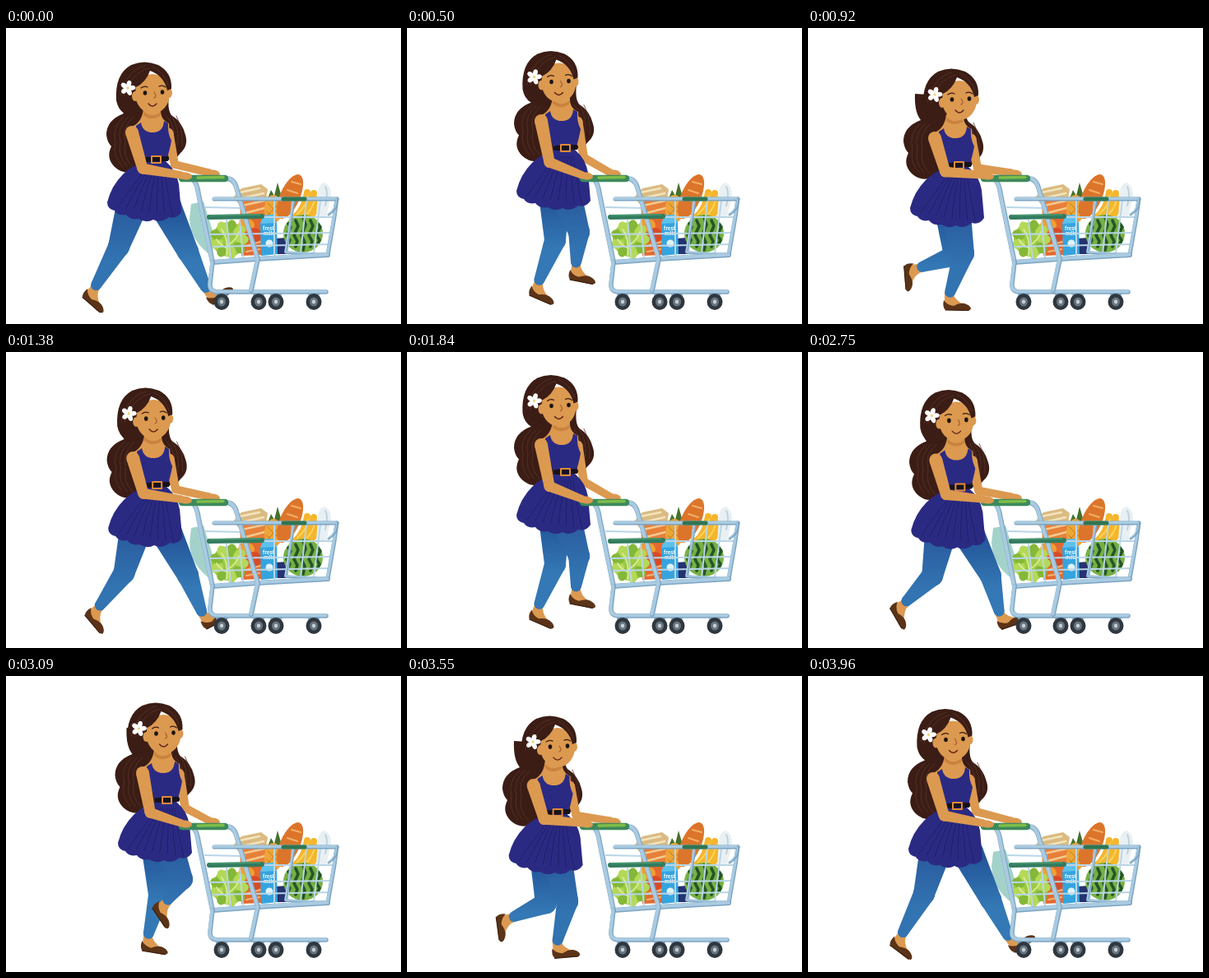
Animation, 480 px wide and 360 px high, one loop 4000 ms. Source, as an HTML page with a canvas:

```html
<!DOCTYPE html>
<html lang="en">
<head>
<meta charset="utf-8">
<title>Shopping walk</title>
<style>
html, body { margin: 0; width: 100%; height: 100%; overflow: hidden; background: #fff; }
canvas { display: block; width: 480px; height: 360px; }
</style>
</head>
<body>
<canvas id="stage"></canvas>
<script>
const canvas = document.getElementById('stage');
const dpr = window.devicePixelRatio || 1;
canvas.width = 480 * dpr;
canvas.height = 360 * dpr;
const c = canvas.getContext('2d');
c.lineCap = c.lineJoin = 'round';

const LOOP = 4000, STEPS = 96, CYCLE = 32;
const SKIN = '#dc9950', SKIN_DARK = '#c9833f', HAIR = '#3b1d15', DRESS = '#2b2a83', FOLD = '#201f6b';
const TUBE = '#a9cbe1', TUBE_DARK = '#7ea5c3';

// phase, body x, body y, head x, head y, hair x
const BODY = [
  [0, 0, 0, 0, 0, 0], [5, 6, 8, 6, 8, 3], [10, 13, -9, 13.5, -9, 10.5],
  [12, 10, -14, 6.5, -13.5, 8], [16, 2, -7, 0, -6, 0], [22, 1, 7, 6, 8, -6],
  [26, 7, -4, 8, -4, 4], [28, 4, -9, 5, -9, 4], [31, -1, -2, -1.5, -1.5, -1]
];
// phase, knee x, knee y, ankle x, ankle y, foot angle
const NEAR = [
  [0, 137, 266, 107, 317, 40], [5, 176, 276, 137, 290, 80], [10, 214, 247, 194, 276, 55],
  [12, 209, 248, 205, 290, 10], [16, 221, 270, 243, 321, -35], [22, 189, 274, 171, 326, 0],
  [26, 163, 272, 156, 323, 10], [31, 141, 265, 113, 316, 36]
];
const FAR = [
  [0, 221, 272, 245, 320, -35], [5, 219, 270, 213, 320, 0], [10, 186, 266, 172, 318, 8],
  [12, 180, 258, 159, 311, 22], [16, 139, 260, 108, 314, 42], [22, 178, 277, 134, 292, 84],
  [26, 229, 257, 195, 297, 52], [31, 222, 272, 245, 320, -35]
];

// smooth periodic curve through the keys
function sample(keys, p) {
  const n = keys.length;
  const at = i => {
    const turn = Math.floor(i / n), k = keys[i - turn * n];
    return [k[0] + turn * CYCLE, ...k.slice(1)];
  };
  let i = n - 1;
  while (keys[i][0] > p) i--;
  const [a, b, d, e] = [at(i - 1), at(i), at(i + 1), at(i + 2)];
  const span = d[0] - b[0], u = (p - b[0]) / span, u2 = u * u, u3 = u2 * u;
  return b.slice(1).map((v, j) => {
    const w = d[j + 1];
    const m0 = (w - a[j + 1]) / (d[0] - a[0]) * span;
    const m1 = (e[j + 1] - v) / (e[0] - b[0]) * span;
    return (2 * u3 - 3 * u2 + 1) * v + (u3 - 2 * u2 + u) * m0 + (3 * u2 - 2 * u3) * w + (u3 - u2) * m1;
  });
}

const fill = (d, color) => { c.fillStyle = color; c.fill(new Path2D(d)); };
const line = (d, color, w) => { c.strokeStyle = color; c.lineWidth = w; c.stroke(new Path2D(d)); };
function oval(x, y, rx, ry, color, turn = 0) {
  c.beginPath();
  c.ellipse(x, y, rx, ry, turn, 0, Math.PI * 2);
  c.fillStyle = color;
  c.fill();
}
function shifted(x, y, draw) {
  c.save();
  c.translate(x, y);
  draw();
  c.restore();
}
function taper(x0, y0, r0, x1, y1, r1, color) {
  const a = Math.atan2(y1 - y0, x1 - x0) + Math.PI / 2, s = Math.sin(a), k = Math.cos(a);
  c.beginPath();
  c.moveTo(x0 + k * r0, y0 + s * r0);
  c.lineTo(x1 + k * r1, y1 + s * r1);
  c.lineTo(x1 - k * r1, y1 - s * r1);
  c.lineTo(x0 - k * r0, y0 - s * r0);
  c.fillStyle = color;
  c.fill();
  oval(x0, y0, r0, r0, color);
  oval(x1, y1, r1, r1, color);
}

function leg(keys, p, bx, by, top, low) {
  const [kx, ky, ax, ay, turn] = sample(keys, p);
  const mid = 168 + bx, hx = mid + (kx - mid) * 0.5, hy = 218 + by;
  const shade = c.createLinearGradient(0, hy + 5, 0, hy + 65);
  shade.addColorStop(0, top);
  shade.addColorStop(1, low);

  c.save();
  c.translate(ax, ay);
  c.rotate(turn * Math.PI / 180);
  fill('M-5 -5 L5 -5 Q6 5 20 11 L12 15 L-5 14Z', SKIN);
  fill('M-6 5 Q-2 11 6 12 Q13 8 19 9 Q26 11 27 15 Q27 18 20 18 L-4 17 Q-8 13 -6 5Z', '#5b3317');
  line('M-4 17 L24 17.5', '#3c2212', 1.2);
  c.restore();

  taper(hx, hy, 19, kx, ky, 13, shade);
  const len = Math.hypot(ax - kx, ay - ky) || 1, cut = (len - 5) / len;
  taper(kx, ky, 13, kx + (ax - kx) * cut, ky + (ay - ky) * cut, 6.5, shade);
}

function backHair() {
  fill('M136 72 Q135 94 143 104 Q122 112 122 130 Q123 139 128 144 Q121 158 132 169 Q144 180 160 173 L196 160 Q207 160 212 152 Q222 143 218 130 Q214 114 201 106 Q195 98 199 76Z', HAIR);
  for (let i = 0; i < 3; i++) {
    const x = i * 6;
    line(`M${143 + x} 108 Q${128 + x} 121 ${133 + x} 139 Q${129 + x} 155 ${141 + x} 168`, '#59342a', 0.8);
    line(`M${195 + x} 107 Q${209 + x / 2} 122 ${202 + x} 143`, '#59342a', 0.8);
  }
}

function torso() {
  fill('M167 98 L188 98 Q187 111 198 116 L199 132 L155 134 L150 121 Q165 117 167 98Z', SKIN);
  fill('M167 101 Q177 111 188 102 L187 107 Q177 114 167 106Z', SKIN_DARK);
  fill('M158 119 L164 115 Q166 128 180 127 Q191 126 192 113 L197 116 Q196 127 201 137 Q199 149 194 164 L169 166 Q166 146 158 137Z', DRESS);
  fill('M168 163 L195 163 Q207 173 210 190 L213 224 Q207 233 198 230 Q188 238 179 233 Q170 238 161 232 Q151 234 146 227 Q136 229 132 222 Q123 220 123 212 Q128 192 142 178 Q153 167 168 163Z', DRESS);
  for (let i = 0; i < 8; i++)
    line(`M${171 + i * 3} 170 Q${153 + i * 6} 193 ${136 + i * 9.5} ${218 + i * 1.5}`, FOLD, 1);
  line('M171 160 L195 159', '#17121a', 6);
  line('M177 156 H188 V164 H177Z', '#e08a35', 2);
}

function head() {
  oval(198, 79, 4, 6, SKIN);
  oval(178, 80, 21, 24, SKIN);
  fill('M134 88 Q132 56 152 45 Q168 38 185 45 Q202 54 201 74 L196 76 Q192 58 175 52 Q170 66 158 72 Q154 80 159 94 Q153 102 144 104 Q136 99 134 88Z', HAIR);
  line('M174 49 Q153 53 143 83', '#5a342a', 0.8);
  line('M169 46 Q147 51 139 82', '#5a342a', 0.8);
  line('M178 47 Q192 53 197 69', '#5a342a', 0.8);
  oval(157, 83, 4, 6, SKIN);
  oval(169, 79, 2.3, 2.8, '#1d1512');
  oval(190, 78, 2.3, 2.8, '#1d1512');
  line('M164 73 Q168 70 172 72 M186 71 Q190 69 194 72', '#3b1d15', 1.2);
  line('M180 78 Q184 84 180 85', '#a86230', 1.3);
  line('M173 92 Q178 98 183 92', '#5a2317', 1.4);
  for (let i = 0; i < 5; i++) {
    const a = i * Math.PI * 0.4 - 1.3;
    oval(148 + Math.cos(a) * 5, 73 + Math.sin(a) * 5, 4.4, 2.9, '#fff', a);
  }
  oval(148, 73, 1.8, 1.8, '#efd68a');
}

function arm(sx, sy, ex, ey, hx, hy, r) {
  taper(sx, sy, r, ex, ey, r - 1.5, SKIN);
  taper(ex, ey, r - 1.5, hx - 8, hy - 1, 4.5, SKIN);
  oval(hx - 3, hy, 8, 4.5, SKIN, 0.12);
}

function groceries() {
  fill('M276 206 L286 195 L310 190 L318 196 L316 208 L288 220Z', '#d9bb83');
  line('M284 200 L308 195 M287 207 L313 201', '#f4e3bc', 2.5);
  fill('M284 211 L320 205 L333 232 L310 240 L285 230Z', '#e6803a');
  line('M287 216 L314 210 M291 225 L318 218', '#f6c98e', 2.5);
  fill('M317 210 L322 197 L326 204 L330 188 L334 202 L338 206 L330 214Z', '#45712d');
  oval(325, 220, 11, 17, '#eda638');
  line('M318 213 L332 227 M317 223 L328 235 M333 212 L318 228', '#c97422', 1);
  // loaf
  oval(345, 205, 12, 29, '#dc752b', 0.42);
  line('M347 187 L358 190 M342 197 L354 201 M337 207 L350 211', '#f3ae66', 2);
  line('M350 231 Q363 221 366 200 M359 231 Q372 220 374 201 M368 230 Q379 222 379 209', '#f5b62d', 8);
  line('M354 226 Q366 216 367 204 M366 226 Q375 216 375 206', '#fbd45a', 2);
  fill('M377 230 L379 201 Q380 189 387 188 Q395 191 395 204 L389 230Z', '#e8f0f3');
  line('M388 193 Q392 200 388 216', '#bfd3dc', 2);
  fill('M285 233 L311 231 L312 276 L286 277Z', '#e4692f');
  oval(292, 240, 10, 8, '#f0a030');
  oval(301, 252, 10, 9, '#d94a27');
  line('M291 265 L309 260 M292 272 L308 269', '#f4b27a', 2);
  // lettuce
  oval(271, 257, 21, 21, '#9cca44');
  for (let i = 0; i < 9; i++) {
    const a = i * 0.7;
    oval(271 + Math.cos(a) * 16, 257 + Math.sin(a) * 16, 8, 6, i % 2 ? '#84b838' : '#b4d957', a);
  }
  line('M268 276 Q271 257 262 245 M270 264 Q280 258 283 248 M269 268 Q259 263 256 257', '#d8eb97', 1.8);
  fill('M327 256 L341 255 L341 275 L328 275Z', '#263271');
  // carton
  fill('M309 238 L313 228 L325 227 L329 237 L330 275 L310 277Z', '#35a4de');
  fill('M313 228 L325 227 L329 237 L309 238Z', '#5fc0ec');
  oval(320, 262, 4.5, 4.5, '#dff3fc');
  c.fillStyle = '#fff';
  c.font = 'bold 6px Inter, sans-serif';
  c.fillText('fresh', 312, 246);
  c.fillText('milk', 313, 252);
  // melon
  oval(361, 250, 24, 23, '#76b043');
  for (let i = 0; i < 5; i++) {
    const x = 343 + i * 9, h = 20 - Math.abs(i - 2) * 4;
    line(`M${x} ${250 - h} L${x + 3} ${246 - h / 3} L${x - 2} 252 L${x + 2} ${254 + h / 3} L${x} ${250 + h}`, '#245528', 3.6);
  }
}

function tube(d, w) {
  line(d, TUBE_DARK, w);
  c.save();
  c.translate(-0.6, -0.6);
  line(d, TUBE, w - 1.6);
  c.restore();
}

function wheel(x) {
  fill(`M${x - 7} 323 L${x + 7} 323 L${x + 5} 335 L${x - 5} 335Z`, TUBE_DARK);
  oval(x, 333, 9.5, 10, '#2f373f');
  oval(x, 333, 5, 5.5, '#69747d');
  oval(x, 333, 2.2, 2.4, '#c4d0d8');
}

function cart() {
  groceries();
  const bars = [[268, 234, 273, 281], [284, 234, 288, 280], [326, 210, 326, 279],
    [348, 210, 342, 273], [365, 210, 358, 274], [382, 210, 374, 274]];
  for (const [a, b, d, e] of bars) line(`M${a} ${b} L${d} ${e}`, '#b9d6e7', 2);
  line('M242 218 L290 219 M247 251 L396 249 M251 266 L393 263 M312 230 L398 230', '#b9d6e7', 2);
  tube('M350 209 L340 272', 3.5);
  tube('M340 273 L391 276', 3.5);
  tube('M402 208 L399 230 L391 276', 5);
  tube('M391 276 L305 281 L251 285', 6);
  tube('M227 184 Q232 188 234 202 L251 285', 6);
  tube('M251 285 L248 311 Q247 321 258 321 L389 321', 5.5);
  tube('M267 183 Q277 183 280 194 L306 281 L298 319', 6);
  tube('M253 208 L402 208', 5);
  tube('M402 208 Q403 220 392 227', 3);
  line('M337 208 L363 208', '#2f7653', 5);
  line('M247 230 L311 229', '#327c5e', 6);
  line('M248 228 L309 227', '#4b9a70', 1.3);
  line('M214 183 L266 183', '#3c8a5c', 8.5);
  line('M233 182 L264 181.5', '#7fbd48', 3.4);
  [262, 307, 328, 374].forEach(wheel);
}

function draw(p) {
  const [bx, by, hx, hy, lx] = sample(BODY, p);
  c.setTransform(dpr, 0, 0, dpr, 0, 0);
  c.fillStyle = '#fff';
  c.fillRect(0, 0, 480, 360);
  if (p >= 29 || p <= 3)
    fill('M225 214 L240 211 L252 250 L251 278 Q224 260 223 232Z', '#a3d2cb');
  else if (p >= 25)
    fill('M218 187 L227 188 L240 232 L214 226Z', '#77aabd');

  shifted(lx, hy, backHair);
  leg(FAR, p, bx, by, '#23569a', '#3478b5');
  leg(NEAR, p, bx, by, '#2a5d9f', '#3273b1');
  arm(197 + bx, 128 + by, 205 + bx, 166 + by * 0.6, 255, 177, 6.5);
  shifted(bx, by, torso);
  shifted(hx, hy, head);
  cart();
  arm(153 + bx, 127 + by, 166 + bx * 0.7, 171 + by * 0.55, 221, 180, 8);
}

const start = performance.now();
function tick(now) {
  const t = Math.max(0, now - start) % LOOP;
  draw(Math.floor((t + 4) * STEPS / LOOP) % CYCLE);
  requestAnimationFrame(tick);
}
draw(0);
requestAnimationFrame(tick);
</script>
</body>
</html>
```
